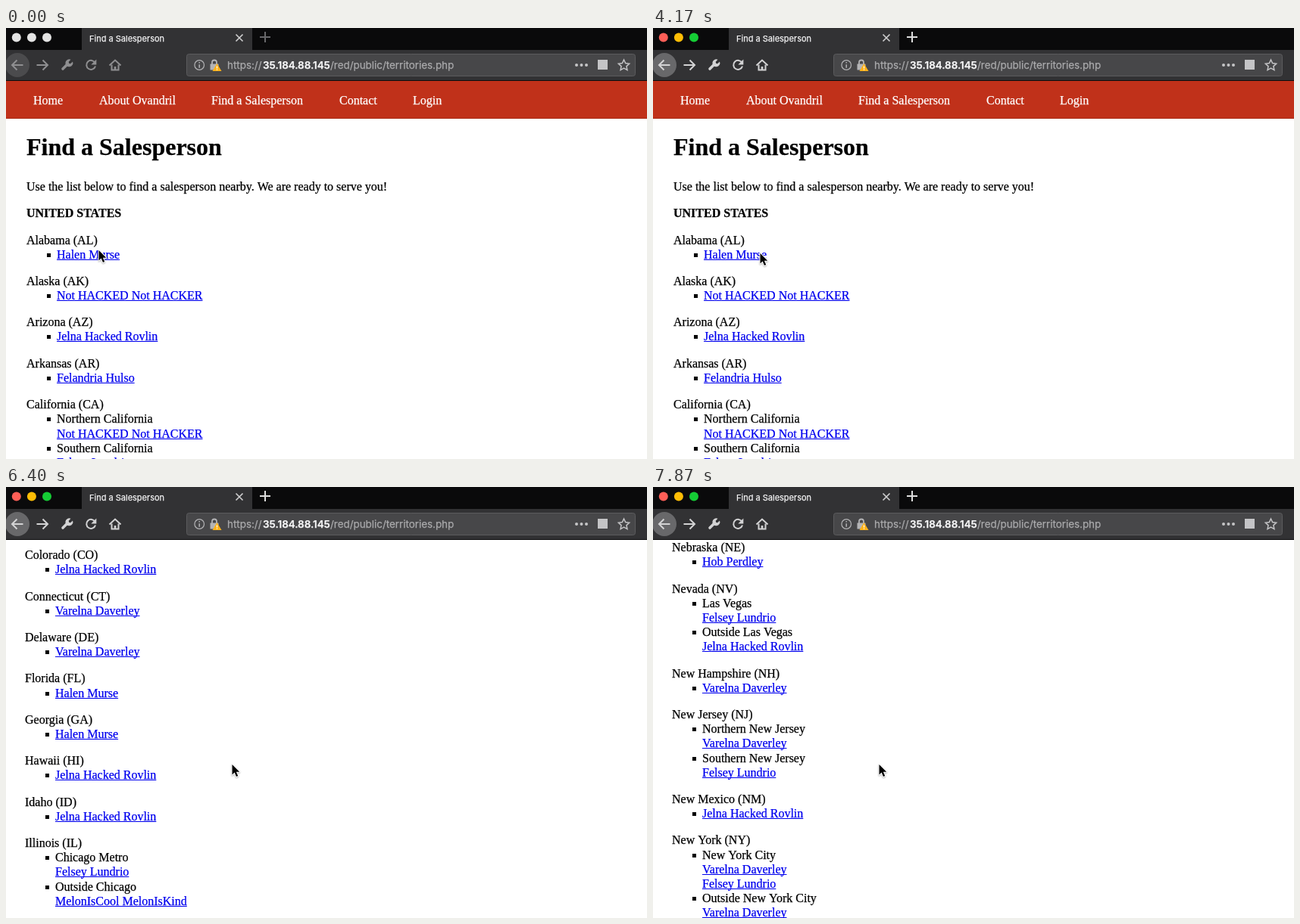
An HTML page with a canvas that plays this animation: 846x570 px, repeating every 8000 ms.

```html
<!DOCTYPE html>
<html lang="en">
<head>
<meta charset="utf-8">
<title>Find a Salesperson</title>
<style>
  html, body { margin: 0; width: 100%; height: 100%; overflow: hidden; background: #fff; }
  canvas { display: block; }
</style>
</head>
<body>
<canvas id="stage" width="846" height="570"></canvas>
<script>
const ctx = document.getElementById('stage').getContext('2d');
const LOOP = 8000, TICK = 148.6, ACTIVATE = 12;
const SERIF = '"Liberation Serif", serif', SANS = 'Inter, sans-serif';

const people = {
  D: 'Halen Murse', N: 'Not HACKED Not HACKER', I: 'Jelna Hacked Rovlin',
  E: 'Felandria Hulso', S: 'Felsey Lundrio', B: 'Varelna Daverley',
  A: 'MelonIsCool MelonIsKind', H: 'Domrel Gorser', K: 'Hob Perdley'
};

// State>entries; an entry is a person key or Region=keys
const territories = `Alabama (AL)>D
Alaska (AK)>N
Arizona (AZ)>I
Arkansas (AR)>E
California (CA)>Northern California=N,Southern California=S
Colorado (CO)>I
Connecticut (CT)>B
Delaware (DE)>B
Florida (FL)>D
Georgia (GA)>D
Hawaii (HI)>I
Idaho (ID)>I
Illinois (IL)>Chicago Metro=S,Outside Chicago=A
Indiana (IN)>H
Iowa (IA)>A
Kansas (KS)>K
Kentucky (KY)>H
Louisiana (LA)>E
Maine (ME)>B
Maryland (MD)>B
Massachusetts (MA)>B
Michigan (MI)>H
Minnesota (MN)>A
Mississippi (MS)>E
Missouri (MO)>K
Montana (MT)>K
Nebraska (NE)>K
Nevada (NV)>Las Vegas=S,Outside Las Vegas=I
New Hampshire (NH)>B
New Jersey (NJ)>Northern New Jersey=B,Southern New Jersey=S
New Mexico (NM)>I
New York (NY)>New York City=BS,Outside New York City=B`;

const rows = [];
let rowY = 285.5;
function addRow(text, x, link, bullet) {
  rows.push({ text, x, y: rowY, link, bullet });
  rowY += 19.2;
}
for (const line of territories.split('\n')) {
  const [state, entries] = line.split('>');
  addRow(state, 27);
  for (const entry of entries.split(',')) {
    const [keys, region] = entry.split('=').reverse();
    if (region) addRow(region, 67, false, true);
    for (const key of keys) addRow(people[key], 67, true, !region);
  }
  rowY += 16;
}

// [tick, scroll]
const scrollKeys = [[36, 0], [37, 60], [39, 290], [41, 440], [43, 520], [44, 548],
                    [45, 630], [47, 916], [50, 1370], [53, 1730]];
// [tick, horizontal drift]
const driftKeys = [[39, 0], [42, -2], [45, -2], [47, 0], [50, 0], [53, -2]];
// [tick, x, y, hand]
const pointerKeys = [
  [0, 122, 294, 0], [1, 125, 296, 0], [2, 127, 297, 0], [5, 128, 297, 1], [12, 128, 298, 1],
  [19, 129, 299, 1], [20, 127, 298, 1], [24, 139, 297, 1], [25, 160, 296, 0], [26, 182, 297, 0],
  [27, 164, 298, 0], [28, 141, 298, 0], [29, 126, 296, 1], [30, 115, 293, 1], [31, 110, 294, 1],
  [32, 114, 295, 1], [34, 230, 342, 0], [35, 298, 367, 0]
];

function interpolate(keys, tick) {
  if (tick <= keys[0][0]) return keys[0][1];
  for (let i = 1; i < keys.length; i++) {
    const [t0, a] = keys[i - 1], [t1, b] = keys[i];
    if (tick <= t1) return a + (b - a) * (tick - t0) / (t1 - t0);
  }
  return keys[keys.length - 1][1];
}

function rect(x, y, w, h, color) {
  ctx.fillStyle = color;
  ctx.fillRect(x, y, w, h);
}
function disc(x, y, r, color) {
  ctx.fillStyle = color;
  ctx.beginPath();
  ctx.arc(x, y, r, 0, 7);
  ctx.fill();
}
// The hairline stroke gives the slightly heavier smoothed text
function label(text, x, y, font, color) {
  ctx.font = font;
  ctx.fillStyle = ctx.strokeStyle = color;
  ctx.lineWidth = 0.25;
  ctx.fillText(text, x, y);
  ctx.strokeText(text, x, y);
}
function stroke(path, color, width = 2) {
  ctx.strokeStyle = color;
  ctx.lineWidth = width;
  ctx.stroke(new Path2D(path));
}
function fill(path, color) {
  ctx.fillStyle = color;
  ctx.fill(new Path2D(path));
}

function drawPage(scroll, drift) {
  const body = '16px ' + SERIF, ink = '#000', link = '#0000ee';
  rect(0, 0, 846, 570, '#fff');
  ctx.save();
  ctx.translate(drift, -scroll);
  rect(-drift, 70, 846, 50, '#c0311a');
  rect(-drift, 119, 846, 1, '#a82b17');
  [['Home', 36], ['About Ovandril', 123], ['Find a Salesperson', 271], ['Contact', 440], ['Login', 537]]
    .forEach(([text, x]) => label(text, x, 101, body, '#fff'));
  label('Find a Salesperson', 27, 168, 'bold 32px ' + SERIF, ink);
  label('Use the list below to find a salesperson nearby. We are ready to serve you!', 27, 215, body, ink);
  label('UNITED STATES', 27, 250, 'bold 16px ' + SERIF, ink);
  for (const { text, x, y, link: isLink, bullet } of rows) {
    const base = Math.round(y);
    if (base < scroll + 50 || base > scroll + 590) continue;
    label(text, x, base, body, isLink ? link : ink);
    if (isLink) rect(x, base + 1, ctx.measureText(text).width, 1, link);
    if (bullet) rect(54, base - 7, 5, 5, ink);
  }
  ctx.restore();
}

function drawToolbar(active) {
  const icon = active ? '#d3d3d4' : '#8f8f91';
  const grey = '#b4b4b6';
  rect(0, 0, 846, 29, '#0a0a0b');
  rect(100, 0, 225, 29, '#323234');
  rect(0, 29, 846, 40, '#323234');
  rect(0, 69, 846, 1, '#0c0c0d');

  const lights = active ? ['#ff5f57', '#ffbd05', '#15cc35'] : ['#e3e3e3', '#e3e3e3', '#e3e3e3'];
  lights.forEach((color, i) => disc(13.8 + i * 20.1, 12.5, 6, color));
  label('Find a Salesperson', 110, 18, '11px ' + SANS, '#f4f4f5');
  stroke('M303.5 8.5l9 9m0-9l-9 9', '#d0d0d1', 1.6);
  stroke('M335 12h14M342 5v14', active ? '#dedede' : '#67676a');

  disc(15, 49, 16, active ? '#68686a' : '#4b4b4d');
  stroke('M22.5 49H8.5m6-6.5L8 49l6.5 6.5', icon);
  stroke('M40.5 49h14m-6-6.5L55 49l-6.5 6.5', icon);
  ctx.lineCap = 'round';
  stroke('M75 54l6.5-6.5', icon, 3.6);
  ctx.lineCap = 'butt';
  fill('M85.5 41.8l-2.8 3 .4 2 2 .4 2.9-2.8a5 5 0 1 1-2.5-2.6z', icon);
  stroke('M117.5 46a6 6 0 1 0 .5 4.5', icon);
  fill('M119.3 41.5v7h-7z', icon);
  stroke('M136.5 49.5l7.5-7 7.5 7', icon);
  stroke('M139.5 48.5V55.5h9v-7', icon);
  rect(142.7, 51, 2.6, 4.5, icon);

  ctx.beginPath();
  ctx.roundRect(238.5, 34.5, 592, 29, 3);
  ctx.fillStyle = '#474749';
  ctx.fill();
  ctx.strokeStyle = '#5b5b5d';
  ctx.lineWidth = 1;
  ctx.stroke();

  stroke('M261.5 49a6.3 6.3 0 1 1-12.6 0a6.3 6.3 0 1 1 12.6 0', grey, 1.2);
  stroke('M255.2 45v1.6m0 1.6v4.6', grey, 1.5);
  stroke('M272 48v-2.5a3 3 0 0 1 6 0V48', grey, 1.8);
  rect(269.5, 47.5, 11, 8, grey);
  fill('M278.5 47l6 10h-12z', '#ffb31a');
  stroke('M278.5 50.5v3m0 1v1.2', '#fff', 1.2);

  const url = '13.4px ' + SANS;
  label('https://', 292, 54, url, '#aaaaac');
  label('35.184.88.145', 339, 54, '600 ' + url, '#f9f9fa');
  label('/red/public/territories.php', 428, 54, url, '#aaaaac');

  [753, 759.5, 766].forEach(x => disc(x, 49, 2, '#c4c4c6'));
  rect(781, 42, 13, 13, '#c4c4c6');
  let star = '';
  for (let i = 0; i < 10; i++) {
    const a = Math.PI * (i / 5 - 0.5), r = i % 2 ? 3.6 : 7.5;
    star += (i ? 'L' : 'M') + (815.5 + r * Math.cos(a)) + ' ' + (49.5 + r * Math.sin(a));
  }
  stroke(star + 'Z', '#c4c4c6', 1.5);
}

function drawPointer([, x, y, hand]) {
  ctx.save();
  ctx.translate(x, y - 0.5);
  ctx.lineJoin = 'round';
  ctx.shadowColor = 'rgba(0,0,0,.3)';
  ctx.shadowBlur = 2;
  ctx.shadowOffsetY = 1;
  if (hand) {
    const shape = 'M-1.5 1.5Q0-.5 1.5 1.5V7Q3 5.5 4 7.3Q5.5 6.3 6.5 8Q8.5 7.3 8.7 9.5V12Q8.5 14 7 16V17.5H-1V16Q-3 13-5 10.8Q-5.3 8-1.5 10.5Z';
    fill(shape, '#fff');
    ctx.shadowColor = 'transparent';
    stroke(shape, '#000', 1.1);
    stroke('M1.5 13v3M3.5 13v3M5.5 13v3', '#000', 0.7);
  } else {
    const shape = 'M.5 .5V14L3.6 11.1 6 16.5 8.2 15.5 5.9 10.3H10.2Z';
    stroke(shape, '#fff', 2);
    ctx.shadowColor = 'transparent';
    fill(shape, '#000');
  }
  ctx.restore();
}

function draw() {
  const tick = Math.floor(performance.now() % LOOP / TICK + 0.05);
  drawPage(Math.round(interpolate(scrollKeys, tick)), Math.round(interpolate(driftKeys, tick)));
  drawToolbar(tick >= ACTIVATE);
  drawPointer(pointerKeys.filter(key => key[0] <= tick).pop());
  requestAnimationFrame(draw);
}
draw();
</script>
</body>
</html>
```
